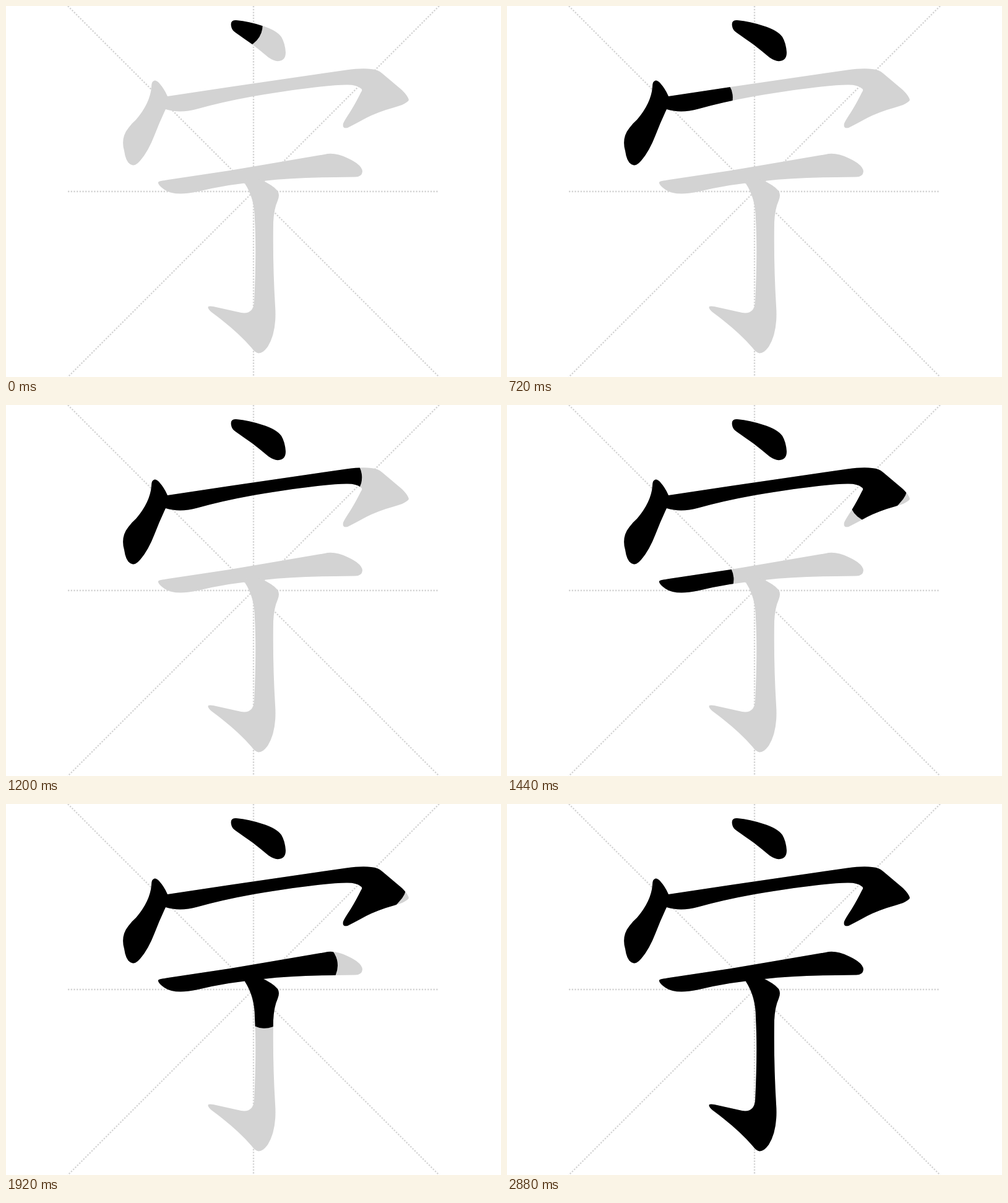
Animation, 800 px wide and 600 px high, one loop 2.94 s. Source, as an HTML page:

```html
<!DOCTYPE html>
<html lang="zh">
<head>
<meta charset="utf-8">
<title>宁</title>
<style>
  html, body { margin: 0; width: 100%; height: 100%; overflow: hidden; background: #fff; }
  svg { display: block; width: 100vw; height: 100vh; }
</style>
</head>
<body>
<svg id="stage" viewBox="0 0 800 600">
  <g transform="translate(100 0) scale(2.34375)" stroke="#d3d3d3" stroke-dasharray="1 1">
    <path d="M0 0L256 256"/>
    <path d="M256 0L0 256"/>
    <path d="M128 0V256"/>
    <path d="M0 128H256"/>
  </g>
</svg>
<script>
const LOOP = 2940, STEP = 60, BRUSH = 75;

// shape: outline; spine: brush path; start in ms; speed in px/ms; fill: when the whole outline is inked
const strokes = [
  {
    shape: 'M364 33Q362 22 372 23Q393 25 414 32Q437 39 445 50Q451 60 452 75Q452 88 441 89Q434 90 424 83Q411 72 398 62Q385 53 371 43Q365 39 364 33Z',
    spine: 'M369.5 28L378 31L410 46L436 74',
    start: -25, speed: 0.33
  },
  {
    shape: 'M236 124Q240 117 247 124Q256 134 261 146Q264 154 258 167Q248 188 240 209Q230 235 217 250Q210 258 205 257.5Q194 256 191 234Q185 213 198 197Q203 190 210 184Q233 157 235 131Q235 127 236 124Z',
    spine: 'M241 128L243 150L236 172L219 206L205 245',
    start: 245, speed: 0.33
  },
  {
    shape: 'M258 146.5L361 131L550 103.5Q575 100 590 102Q602 103 608 109L640 136Q650 146 651 152Q650 155 640 160Q628 164 614 168Q590 176 573 186Q560 193 552 197Q543 199 545 190Q547 185 557 170Q565 157 574 139Q577 135 573 133Q566 127 550 127.5Q510 128 400 146Q350 155 309 166.5Q281 174 258 167Z',
    spine: 'M266 157L328 148L538 117L572 113L592 117L610 130L590 153L549 195',
    start: 580, speed: 0.443, fill: 2240
  },
  {
    shape: 'M247 284Q250 283 262 281L362 266L515 240Q531 236 552 246Q576 257 576 268Q575 277 563 276.5L532 277Q466 277 416 283Q387 286 360 290Q335 294 308 300.5Q272 308 256 297Q245 289 246 285Z',
    spine: 'M248 288L329 282L498.5 261L560 262',
    start: 1212, speed: 0.356
  },
  {
    shape: 'M388 281L410 280Q432 290 439 299Q443 305 439 315Q433 328 432 350Q431 420 435 485Q438 527 423 551Q415 562 408 561.5Q403 561 397 553Q374 526 332 495Q325 489 327 486Q329 485 335 486L380 496Q399 499 401 480Q405 400 402 345Q402 312 386 287Z',
    spine: 'M392 286L410 304L418 326L418.5 461L419 500L405 528L370 510L328 487',
    start: 1770, speed: 0.321, fill: 2820
  }
];

const stage = document.getElementById('stage');

function add(parent, tag, attrs) {
  const node = document.createElementNS('http://www.w3.org/2000/svg', tag);
  for (const key in attrs) node.setAttribute(key, attrs[key]);
  return parent.appendChild(node);
}

for (const { shape } of strokes) add(stage, 'path', { d: shape, fill: '#d3d3d3' });

strokes.forEach((stroke, i) => {
  const clip = add(stage, 'clipPath', { id: 'clip' + i });
  add(clip, 'path', { d: stroke.shape });
  stroke.ink = add(stage, 'path', {
    d: stroke.spine, 'clip-path': `url(#clip${i})`, fill: 'none', stroke: '#000',
    'stroke-linecap': 'round', 'stroke-linejoin': 'round'
  });
});

function draw(time) {
  const t = Math.floor((time % LOOP) / STEP) * STEP;
  for (const { ink, start, speed, fill = Infinity } of strokes) {
    const drawn = (t - start) * speed;
    ink.setAttribute('visibility', drawn > 0 ? 'visible' : 'hidden');
    ink.setAttribute('stroke-dasharray', `${Math.max(drawn, 0)} 2000`);
    ink.setAttribute('stroke-width', t >= fill ? 600 : BRUSH);
  }
}

const begin = performance.now();
function tick() {
  draw(performance.now() - begin);
  requestAnimationFrame(tick);
}
tick();
</script>
</body>
</html>
```
